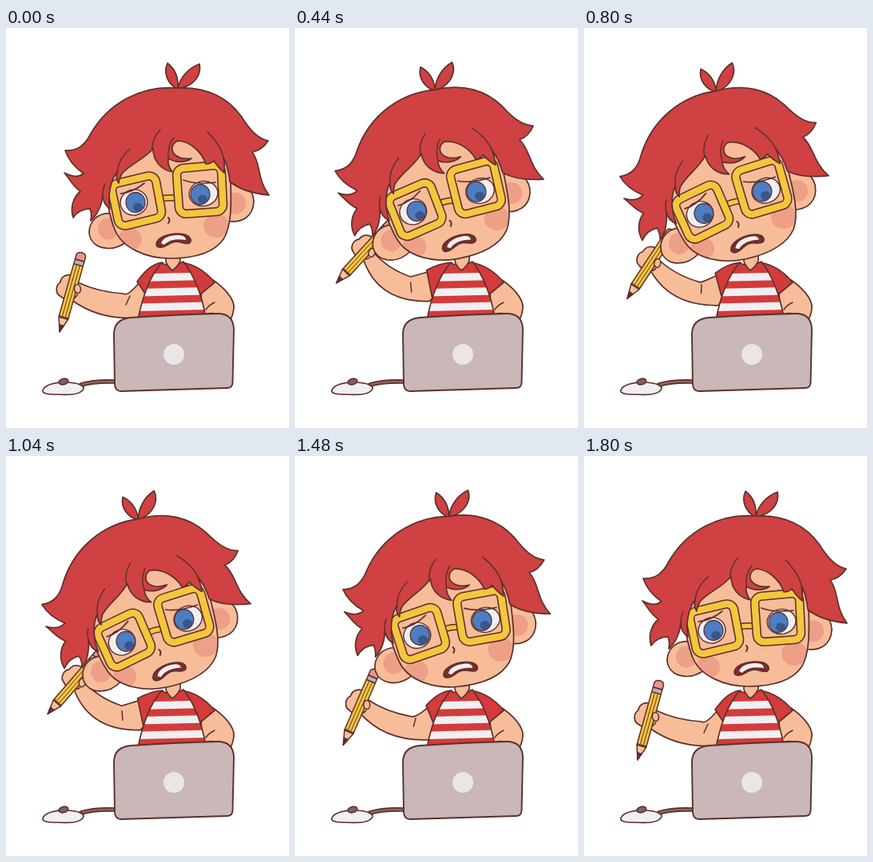
Animation, 354 px wide and 500 px high, one loop 2240 ms. Source, as an HTML page with a canvas:

```html
<!DOCTYPE html>
<html lang="en">
<head>
<meta charset="utf-8">
<title>Puzzled boy</title>
<style>
html, body { margin: 0; width: 100%; height: 100%; overflow: hidden; background: #fff; }
canvas { display: block; width: 354px; height: 500px; }
</style>
</head>
<body>
<canvas id="stage"></canvas>
<script>
const canvas = document.getElementById('stage');
const ctx = canvas.getContext('2d');
const dpr = window.devicePixelRatio || 1;
canvas.width = 354 * dpr;
canvas.height = 500 * dpr;

const LOOP = 2240, STEP = 40, TILT = 12.6;
const LINE = '#5b302c', HAIR = '#cf4142', SKIN = '#f7bd98', BLUSH = '#ee9f87';
const RED = '#d43b3b', WHITE = '#f1eff0', YELLOW = '#f5c63d', GREY = '#cab7b7';
const BLUE = '#4d7dc2', NAVY = '#3b5688';

const rad = d => d * Math.PI / 180;
const ease = u => { u = Math.min(1, Math.max(0, u)); return u * u * (3 - 2 * u); };

function shape(path, fill, width = 1.7, color = LINE) {
  const p = typeof path === 'string' ? new Path2D(path) : path;
  if (fill) { ctx.fillStyle = fill; ctx.fill(p); }
  if (width) { ctx.strokeStyle = color; ctx.lineWidth = width; ctx.stroke(p); }
}

function oval(x, y, rx, ry, turn = 0) {
  const p = new Path2D();
  p.ellipse(x, y, rx, ry, rad(turn), 0, Math.PI * 2);
  return p;
}

function roundPoly(pts, r) {
  const p = new Path2D(), n = pts.length;
  p.moveTo((pts[0][0] + pts[n - 1][0]) / 2, (pts[0][1] + pts[n - 1][1]) / 2);
  pts.forEach((a, i) => p.arcTo(...a, ...pts[(i + 1) % n], r));
  p.closePath();
  return p;
}

function clipped(path, draw) {
  ctx.save();
  ctx.clip(path);
  draw();
  ctx.restore();
}

// Arm poses: low, halfway, raised
const ARM = [
  [167,318, 152,336, 147,332, 115,330, 90,318, 82,340, 118,366, 166,362],
  [166,311, 152,319, 146,321, 112,312, 92,294, 80,306, 108,350, 168,349],
  [166,302, 155,303, 144,306, 118,296, 100,272, 86,274, 98,340, 168,338]
];
const CREASE = [[155,335, 150,346], [148,322, 147,332], [143,316, 145,329]];
const SLEEVE = [[164,317, 174,332], [164,308, 172,334], [165,300, 171,337]];
const PENCIL = [[67,380,15.7], [55,347,29.5], [50,305,49]];
const HALF = 0.4;

function pose(set, a) {
  const i = a < HALF ? 0 : 1;
  const u = i ? (a - HALF) / (1 - HALF) : a / HALF;
  return set[i].map((v, k) => v + (set[i + 1][k] - v) * u);
}

function drawArm(a) {
  const p = pose(ARM, a);
  shape(`M${p[0]} ${p[1]}Q${p.slice(2, 6)}Q${p.slice(6, 10)}L${p.slice(10, 12)}Q${p.slice(12, 16)}L180 330Z`, SKIN);
  const c = pose(CREASE, a);
  shape(`M${c[0]} ${c[1]}L${c[2]} ${c[3]}`, null, 1.5);

  const [x, y, turn] = pose(PENCIL, a);
  ctx.save();
  ctx.translate(x, y);
  ctx.rotate(rad(turn));
  // palm behind, pencil, fingertip in front
  shape('M-1 -72C-10 -74 -17 -68 -16 -60C-21 -54 -18 -44 -10 -43C-2 -39 7 -44 9 -51', SKIN);
  shape('M0 0L-6 -18L6 -18Z', '#f3c39c', 1.5);
  shape('M0 0L-3 -9L3 -9Z', LINE, 1);
  shape('M-6 -18L-6 -87L6 -87L6 -18Q4 -21 2 -18Q0 -21 -2 -18Q-4 -21 -6 -18Z', YELLOW, 1.5);
  shape('M-2 -20V-87M2 -20V-87', null, 0.9);
  shape('M-6 -87H6V-93H-6Z', '#bdb0b0', 1.4);
  shape('M-6 -93V-99Q-5 -103 0 -103Q5 -103 6 -99V-93Z', '#e9968a', 1.5);
  shape(oval(7, -58, 4, 5.5, -25), SKIN, 1.5);
  ctx.restore();
}

function drawBody(a) {
  // far arm
  shape('M259 315C272 324 286 338 285 350Q284 360 279 368L246 368L244 330Z', SKIN);
  shape('M249 358Q258 354 272 361M250 352Q254 346 261 343', null, 1.4);
  shape('M220 293Q244 297 261 318L243 333L232 310Z', RED);
  drawArm(a);
  const s = pose(SLEEVE, a);
  shape(`M196 293Q180 294 ${s[0]} ${s[1]}L${s[2]} ${s[3]}L190 318Z`, RED);

  const torso = new Path2D('M194 294Q208 299 222 292Q242 318 250 362L165 365Q174 318 194 294Z');
  shape(torso, RED, 0);
  clipped(torso, () => {
    for (let y = 311; y < 360; y += 18.5) {
      shape(`M160 ${y + 1.5}L255 ${y - 1}`, null, 9.5, WHITE);
    }
  });
  shape(torso);
  shape('M200 282V292Q203 299 208 303Q215 298 218 291V282Z', SKIN);
}

function drawDesk() {
  shape('M94 446Q110 441 137 442', null, 5.6);
  shape('M94 446Q110 441 137 442', null, 2.4, '#94665e');
  shape('M46 453C48 446 62 442 78 443C91 444 98 447 97 451C94 458 78 459 64 458C52 458 45 457 46 453Z', WHITE);
  shape(oval(72, 442, 6, 3.7, -14), '#7c625f', 1.5);
  shape('M135 383Q135 364 156 362Q216 358 265 357Q284 357 285 376L283.500 443Q283.500 450 276 450L144 454Q137 454 136 446Z', GREY, 1.9);
  shape(oval(210, 408, 13, 13), '#eae6e7', 0);
}

function drawEye(x, y, rx, ry, turn, ix, iy) {
  const white = oval(x, y, rx, ry, turn);
  shape(white, WHITE, 0);
  clipped(white, () => {
    shape(oval(ix, iy, 12, 12.5), BLUE, 1.3);
    shape(oval(ix + 3, iy + 6, 6, 5.5), NAVY, 0);
  });
  shape(white, null, 1.4);
}

function drawGlasses(pts) {
  const p = roundPoly(pts, 9);
  shape(p, null, 11.5);
  shape(p, null, 8.4, YELLOW);
}

const FACE = new Path2D('M122 190C126 216 130 238 136 252C145 275 176 288 205 288C235 288 260 281 272 264C282 248 282 222 281 190L270 130L150 130Z');

function drawFeatures(look) {
  // features slide a little across the face as it tilts
  ctx.translate(1.5 * look, 3 * look);
  drawEye(160, 218, 17, 16, -14, 162 + 3 * look, 218);
  drawEye(247, 207, 18, 15.5, -8, 243 - look, 208 - look);
  shape('M143 207Q158 206 173 194M222 190Q237 196 262 193', null, 1.7);
  shape('M203 237Q206 240 203 244', null, 2);

  shape('M188 270C189 262 202 257 215 257C227 257 232 262 231 267C228 272 222 268 214 267C205 267 202 273 195 274Q188 275 188 270Z', '#7c2d2c');
  shape('M194 269C197 261 207 259 215 259C221 259 225 261 225 265C217 264 206 263 198 271Z', WHITE, 0);

  shape('M193 210Q203 208 213 209V216Q203 215 194 217Z', YELLOW, 1.5);
  drawGlasses([[131, 196], [186, 183], [196, 236], [142, 249]]);
  drawGlasses([[213, 176], [269, 171], [272, 229], [217, 233]]);
}

function drawHead(look) {
  ctx.save();
  ctx.translate(207, 301);
  ctx.rotate(rad(-TILT * look));
  ctx.translate(-207, -301);

  const ears = [
    [new Path2D('M277 196C294 188 309 199 310 217C309 235 296 245 276 241Z'), 287, 219],
    [new Path2D('M134 232C114 229 104 243 104 256C106 275 130 282 150 268Z'), 128, 251]
  ];
  for (const [ear, x, y] of ears) {
    shape(ear, SKIN, 0);
    clipped(ear, () => shape(oval(x, y, 13, 13.5), BLUSH, 0));
    shape(ear);
  }

  shape(FACE, SKIN, 0);
  clipped(FACE, () => {
    shape(oval(155, 264, 15, 14), BLUSH, 0);
    shape(oval(263, 247, 16, 15), BLUSH, 0);
  });
  shape(FACE);

  ctx.save();
  drawFeatures(look);
  ctx.restore();

  shape('M214 76C203 70 196 57 202 44C211 51 216 60 215 75C218 62 228 50 242 45C245 59 235 71 220 75Z', HAIR);
  shape('M215 75C252 73 278 88 294 110C304 126 314 138 328 141C322 150 315 154 308 155' +
    'C319 169 314 190 329 209C310 207 292 202 280 192C279 181 277 172 272 162' +
    'C274 172 273 177 273 181C268 177 264 172 260 166C257 169 254 170 250 170' +
    'C245 155 231 142 215 141C206 145 206 154 212 159C217 163 225 164 232 163' +
    'C224 169 211 168 203 163C202 170 204 175 208 180C194 177 184 166 184 151' +
    'C170 166 157 169 145 182C143 186 141 190 141 194C137 189 138 184 139 180' +
    'C131 190 127 208 130 226C124 222 121 216 121 209C120 222 114 234 106 241' +
    'C107 235 107 230 105 226C97 226 89 230 84 237' +
    'C80 224 84 212 93 204C84 199 80 189 73 181C82 186 90 187 97 182C87 175 78 165 74 153' +
    'C90 154 99 146 106 132C128 94 169 71 215 75Z', HAIR);
  shape('M183 153C182 143 187 133 193 127M203 163C202 151 205 143 210 137' +
    'M272 163C270 150 261 139 252 130M139 180C140 168 147 158 155 151M121 209Q121 201 124 195', null, 1.4);
  ctx.restore();
}

function state(t) {
  if (t <= 600) {
    const u = ease((t - 40) / 560);
    return { head: u, arm: u };
  }
  const back = 1 - ease((t - 1160) / 600);
  // one and a half scratches before the arm comes down
  const phase = Math.min(1.5, (t - 600) / 352);
  const scratch = 0.75 + 0.25 * Math.cos(2 * Math.PI * phase);
  return { head: back, arm: scratch * back };
}

function render(now) {
  const t = Math.floor(now % LOOP / STEP) * STEP;
  const { head, arm } = state(t);
  ctx.setTransform(dpr, 0, 0, dpr, 0, 0);
  ctx.fillStyle = '#fff';
  ctx.fillRect(0, 0, 354, 500);
  ctx.lineJoin = ctx.lineCap = 'round';
  drawBody(arm);
  drawDesk();
  drawHead(head);
}

let start = null;
function tick(now) {
  if (start === null) start = now;
  render(Math.max(0, now - start));
  requestAnimationFrame(tick);
}
render(0);
requestAnimationFrame(tick);
</script>
</body>
</html>
```
